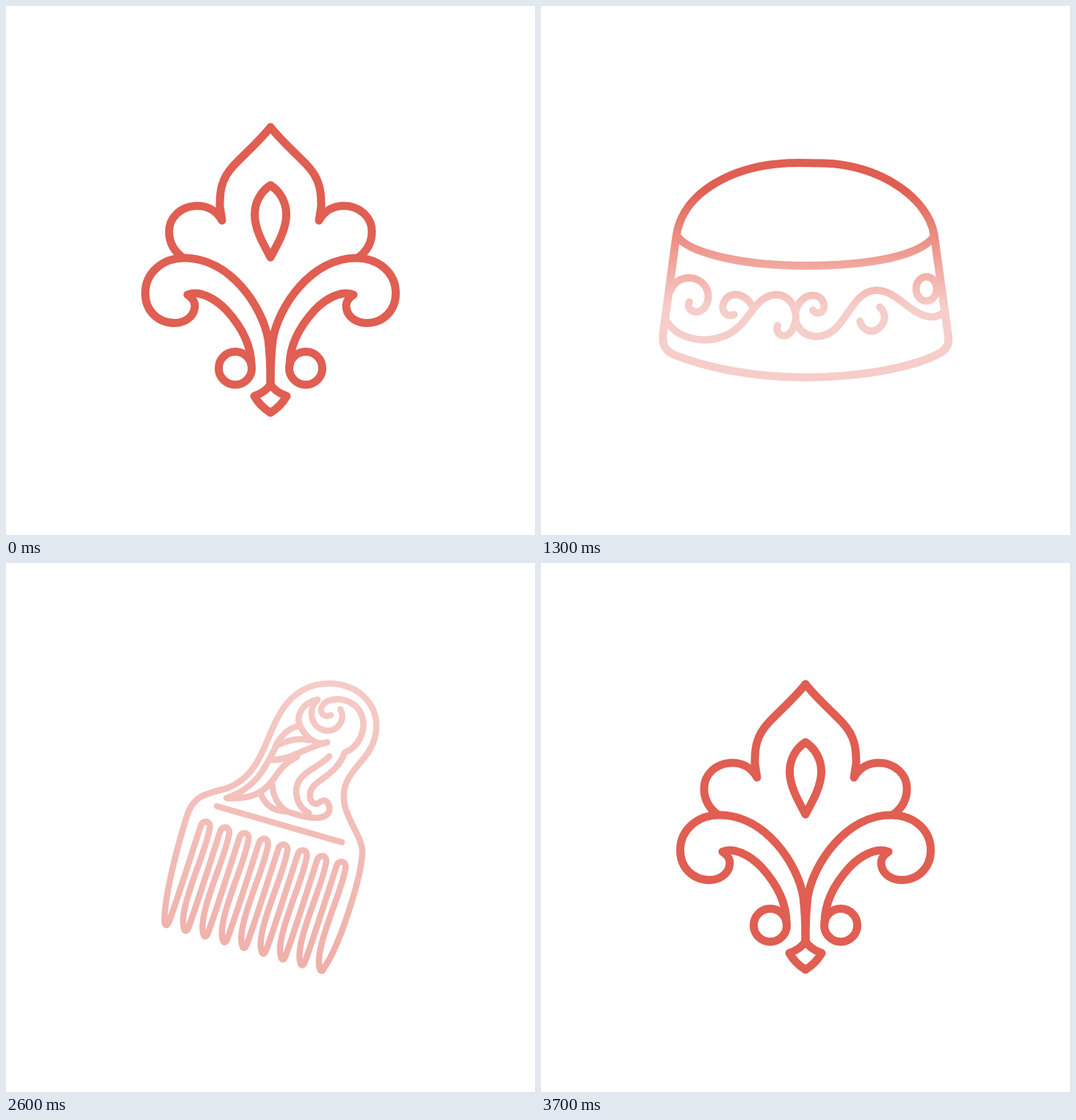
An HTML page that plays this animation: 720 by 720 pixels, repeating every 4000 ms.

```html
<!DOCTYPE html>
<html lang="en">
<head>
<meta charset="utf-8">
<title>Line icons</title>
<style>
  html, body { margin: 0; width: 100%; height: 100%; overflow: hidden; background: #fff; }
  svg { display: block; width: 100vw; height: 100vh; }
  .icon { fill: none; stroke: url(#ink); stroke-width: 11; stroke-linecap: round; stroke-linejoin: round; }
  .band { stroke-width: 10; }
  .fine { stroke-width: 9.5; }
  .carved { stroke-width: 8.5; }
</style>
</head>
<body>
<svg viewBox="0 0 720 720">
  <defs>
    <linearGradient id="ink" gradientUnits="userSpaceOnUse" x1="0" x2="0" y1="160" y2="560">
      <stop offset="0"/><stop offset="1"/>
    </linearGradient>
  </defs>

  <!-- ornament: left half, mirrored -->
  <g class="icon">
    <g id="half">
      <path d="M360 165C342 187 326 200 310 217C292 236 291 254 291 272L294 292C286 277 272 272 260 272C238 272 222 288 222 307C222 322 228 333 240 342"/>
      <path d="M360 515C360 500 360 480 357 455C350 410 305 343 243 343C212 343 189.500 364 189.500 391C189.500 415 207 431.500 230 431.500C248 431 257 419 257 408C257 401 253 397 247 393C262 386 285 398 300 414C322 438 334 462 334 490"/>
      <circle cx="312" cy="493" r="22.500"/>
      <path d="M360 515Q354 525 338 531Q346 545 360 553.500"/>
      <path d="M360 244C346 253 338.500 268 338.500 284C338.500 305 352 327 360 342"/>
    </g>
    <use href="#half" transform="translate(720) scale(-1 1)"/>
  </g>

  <!-- embroidered cap -->
  <g class="icon">
    <path d="M184 314C192 252 265 213.500 350 213.500L385 214C462 216 527 262 535 311L554 447C556 459 554 467 540 474C500 494 430 505 360 505.500C295 505.500 230 494 182 475C166 468 164 458 167 440Z"/>
    <path d="M185 313C200 335 270 353.500 360 353.500C450 353 515 340 535 314"/>
    <g class="band">
      <path d="M176 388C182 374 192 370 202 370C220 371 229 385 227.500 399C225 415 212 419 205 414.500C200 411 200 406 202 403"/>
      <path d="M172 430C185 452 220 460 247 450C283 438 288 396 318 393C335 392 345 405 347 422C346 441 337 450 329 448.500C322 447 320 441 322 435"/>
      <path d="M263 420C250 425 244 412 250 401C258 389 276 389 288 409"/>
      <path d="M370 414C373 418 378 419 382 416C388 411 386 396 372 394C360 393 352 400 347 414M347 430C355 452 380 456 400 440C420 420 430 388 455 387C485 386 500 420 530 423C538 424 543 421 548 417"/>
      <path d="M434 429C438 442 450 446 459 439C470 431 470 417 461 410"/>
      <ellipse cx="524.500" cy="385" rx="14" ry="16.500"/>
    </g>
  </g>

  <!-- axe in a stump -->
  <g class="icon fine">
    <path d="M328 270C375 265 425 195 490 168C510 159 527 174 527 191C527 206 517 213 505 215C435 228 430 292 345 308"/>
    <path d="M299 406C298 385 296 360 290 342L262 291L320 259L345 319C360 340 385 358 415 373C411 390 400 400 385 408M403 369C382 392 350 402 305 408M308 340L345 319"/>
    <path d="M262 297L256 308L268 339Q272 346 280 344L289 340"/>
    <path d="M268 408C275 403 285 403 296 409L405 411"/>
    <path d="M292 386C250 388 228 398 228 410C228 425 280 435 341 435C402 435 454 426 454 410C454 398 440 391 415 388"/>
    <path d="M228 412C226 470 222 522 193 533M454 412C456 470 458 512 485 530C495 537 487 544 475 544C455 544 440 536 431 524"/>
    <path d="M266 438V476M433 435V480M320 461V528M291 471C292 510 285 545 267 554M256 506C253 522 242 534 230 536M363 497C363 525 368 548 377 555M393 457C394 500 395 540 417 550"/>
  </g>

  <!-- carved comb -->
  <g class="icon carved">
    <path id="comb"/>
    <path d="M287 331L457 380"/>
    <path d="M461 258C482 250 491 225 484 207C476 185 446 180 433 191C424 200 431 212 442 207"/>
    <path d="M424 186C411 198 413 223 434 228C452 231 463 212 455 199"/>
    <path d="M424 186C404 190 392 208 402 225C412 243 428 248 437 244"/>
    <path d="M397 222C382 226 373 237 367 249C383 241 399 238 412 241M362 268C388 268 405 252 437 244"/>
    <path d="M369 246C355 275 342 306 300 320C335 322 352 312 365 293C373 281 380 272 396 264M348 317C354 330 364 338 382 338M362 300C363 316 370 330 382 338"/>
    <path d="M440 263C425 280 394 285 395 312C396 326 402 335 412 340"/>
    <path d="M461 258C450 290 418 295 414 312C412 325 420 332 428 325C436 319 443 330 439 340C430 353 402 345 382 338"/>
  </g>
</svg>
<script>
const STEP = 100, LOOP = 4000;
const icons = document.querySelectorAll('.icon');
const ink = document.querySelector('#ink');
const stops = ink.querySelectorAll('stop');

const tip = 'c1 4 4 4 6 -2';
const tooth = tip + 'c8 -20 30 -90 43 -130c3 -10 15 -7 12 4c-4 30 -44 110 -34.6 135.8';
document.querySelector('#comb').setAttribute('d', 'M216 490' + tooth.repeat(8) + tip +
  'C452 525 484 430 485 393C485 375 466 352 461 330C452 285 492 275 502 238' +
  'C513 195 480 164 440 164C405 164 382 185 369 212C351 246 345 290 300 307' +
  'C270 314 254 318 246 345C232 390 214 460 216 490Z');

// Each step: [icon offset, strength above, strength below, fade top, fade bottom]
const quick = [[0, 1, .17, 205, 360], [0, .35, .06, 160, 560], [1, .55, .8, 160, 560]];
const slow = [[0, 1, .31, 250, 410], [0, .5, .12, 160, 560], [1, .06, .15, 160, 560],
              [1, .32, .5, 160, 560], [1, .75, .95, 160, 560]];
const changes = [[400, quick], [1300, slow], [2300, slow], [3400, quick]];

function stateAt(time) {
  let icon = 0;
  for (const [start, steps] of changes) {
    const step = Math.floor((time - start) / STEP);
    if (step < 0) break;
    if (step < steps.length) {
      const [offset, ...fade] = steps[step];
      return [(icon + offset) % icons.length, ...fade];
    }
    icon++;
  }
  return [icon % icons.length, 1, 1, 160, 560];
}

function draw() {
  const [active, above, below, top, bottom] = stateAt(performance.now() % LOOP);
  icons.forEach((icon, i) => icon.style.display = i === active ? '' : 'none');
  ink.setAttribute('y1', top);
  ink.setAttribute('y2', bottom);
  [above, below].forEach((strength, i) => {
    stops[i].style.stopColor = `color-mix(in srgb, #e05e52 ${strength * 100}%, #fff)`;
  });
  requestAnimationFrame(draw);
}
draw();
</script>
</body>
</html>
```
